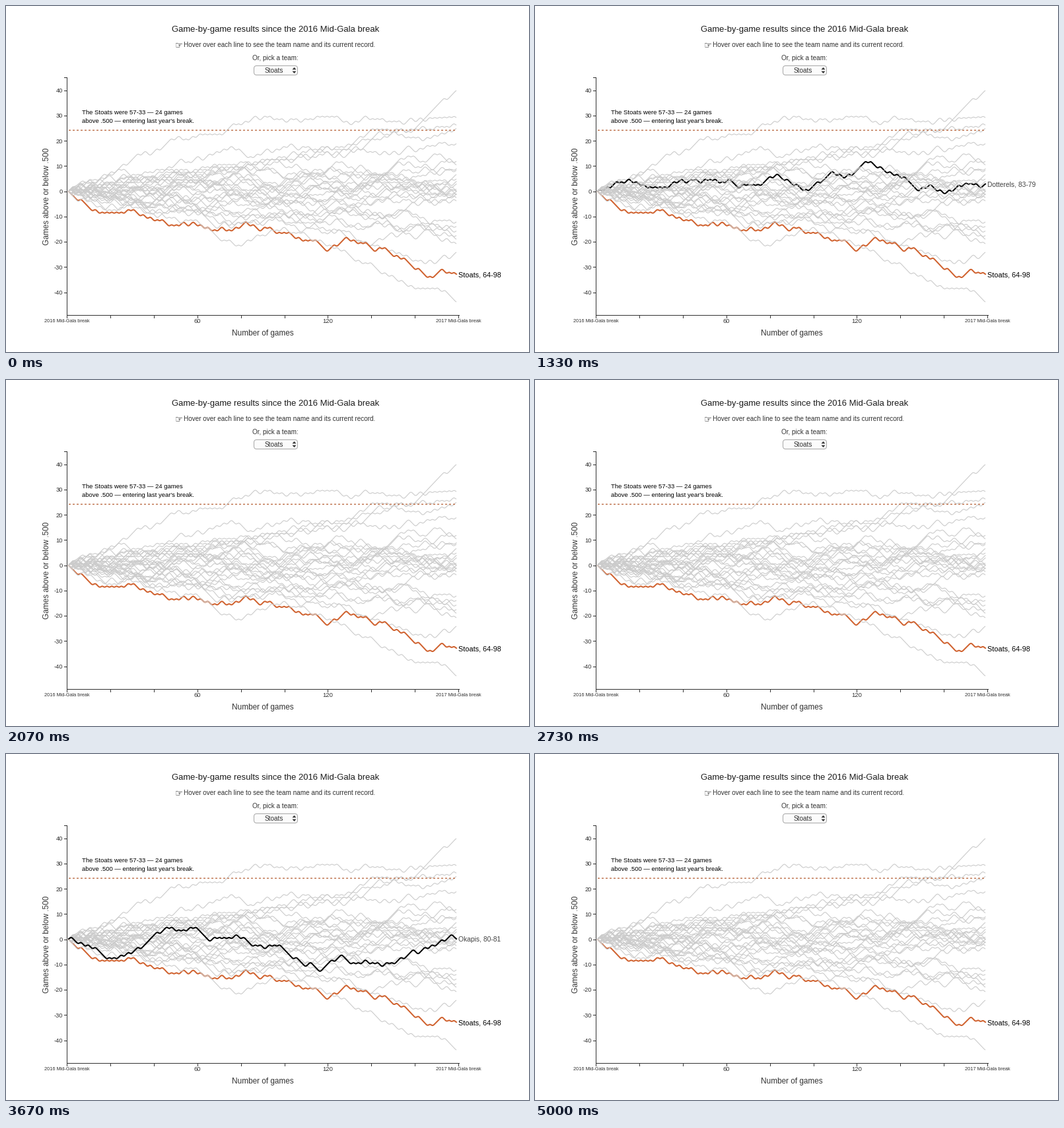
A matplotlib script that plays this animation: 792 px wide and 524 px high, repeating every 5070 ms.

```python
import numpy as np
import matplotlib.pyplot as plt
from matplotlib.animation import FuncAnimation
from matplotlib.collections import LineCollection
from matplotlib.patches import FancyBboxPatch, Polygon

W, H, DPI = 792, 524, 100
PT = 72 / DPI
LEFT, RIGHT, ZERO, UNIT = 95, 682, 280.5, 3.825
GREY, ORANGE, INK = "#cbcbcb", "#d0622f", "#333333"
FRAMES, INTERVAL, RATE = 169, 30, 15

plt.rcParams["font.family"] = ["Liberation Sans", "DejaVu Sans"]
rng = np.random.default_rng(16)
grid = np.arange(LEFT, RIGHT + 1)
games = np.linspace(LEFT, RIGHT, 163)
season = np.linspace(0, 1, len(games))

fig = plt.figure(figsize=(W / DPI, H / DPI), dpi=DPI, facecolor="white")
ax = fig.add_axes([0, 0, 1, 1])
ax.set(xlim=(0, W), ylim=(H, 0))
ax.axis("off")


def to_px(value):
    return ZERO - UNIT * value


def smooth(record):
    """Sample a game-by-game record at every pixel and round off its corners."""
    kernel = np.hanning(9)
    kernel /= kernel.sum()
    dense = np.pad(np.interp(grid, games, to_px(record)), 4, mode="edge")
    return np.convolve(dense, kernel, mode="valid")


def following(*course):
    """Walk of wins and losses that keeps close to key points (x, record)."""
    target = np.interp(games, course[::2], course[1::2])
    walk = [0]
    for goal in target[1:]:
        walk.append(walk[-1] + (1 if goal - walk[-1] + rng.normal(0, 0.6) > 0 else -1))
    return smooth(walk + season**12 * (target[-1] - walk[-1]))


def wandering(end, floor):
    """Free walk of wins and losses that finishes at a given record."""
    while True:
        walk = np.r_[0, np.cumsum(rng.choice([-1, 1], len(games) - 1))]
        drift = walk - season * walk[-1]
        path = smooth(drift + end * season**0.8)
        if np.abs(drift).max() < 10 and (path < floor + 5).all():
            return path


def text(x, y, s, size, color=INK, **kw):
    kw = {"ha": "left", "va": "center_baseline", **kw}
    return ax.text(x, y, s, fontsize=size * PT, color=color, zorder=8, **kw)


def rule(xs, ys, color=INK, width=1, **kw):
    return ax.plot(xs, ys, color=color, lw=width * PT, **kw)[0]


# Team paths
stoats = following(95, 0, 113, -4.5, 145, -8.5, 190, -8, 222, -12, 267, -14, 290, -12.5,
                   310, -15, 348, -15.5, 360, -12.5, 380, -15, 402, -14.5, 432, -18.5,
                   467, -19, 487, -23.5, 519, -18.5, 556, -22.5, 595, -25, 639, -35.5,
                   663, -30, 675, -30.5, 682, -33)
red_newts = following(95, 0, 134, 1, 166, 4.5, 202, 4, 245, 8, 290, 3.5, 320, 2.5, 345, 5.5,
                      384, 1.5, 400, -2.5, 450, -5, 489, -3, 503, 0.5, 520, -2.5,
                      554, 3.5, 625, 3.5, 652, 1.5, 666, -2.5, 682, 0)
dotterels = following(95, 0, 121, 4, 145, 4.5, 168, 2, 192, 2, 212, 4.5, 299, 4, 306, 1.5,
                      339, 2, 363, 7, 409, 0.5, 448, 7, 470, 5.5, 500, 12, 551, 6,
                      581, 0.5, 600, 3, 621, 0, 658, 3.5, 682, 3)
tapirs = following(95, 0, 128, 0.5, 170, 9, 216, 2.5, 257, 8.5, 308, 6, 328, 9.5, 370, 8.5,
                   410, 12, 426, 8.5, 438, 10.5, 452, 8, 507, 8.5, 545, 4.5, 575, 7.5,
                   613, 5, 634, -1.5, 682, -1.5)
okapis = following(95, 0, 118, -1.5, 152, -7.5, 191, -6, 222, 2, 246, 4.5, 290, 4, 306, -0.5,
                   346, 2, 374, -3, 408, -2, 447, -10, 478, -11.5, 502, -7, 526, -9.5,
                   585, -10, 614, -5.5, 655, -2, 674, 2, 682, 0)

outer = [
    following(95, 0, 180, 10, 200, 14, 262, 21, 290, 21, 385, 29, 447, 28, 490, 30,
              520, 27, 553, 29, 600, 27, 682, 29),
    following(95, 0, 340, 10, 440, 13, 530, 20, 562, 25, 615, 24, 645, 32, 682, 40),
    following(95, 0, 220, 8, 342, 17, 370, 14, 430, 18, 500, 14, 600, 24, 682, 26),
    following(95, 0, 320, 10, 500, 15, 575, 24, 605, 20, 682, 25),
    following(95, 0, 300, 7, 480, 17, 590, 15, 682, 19),
    following(95, 0, 290, -13, 345, -21, 410, -15, 470, -19, 560, -31, 620, -38,
              664, -39, 682, -44),
    following(95, 0, 300, -8, 450, -12, 560, -22, 650, -29, 682, -24),
]
ends = [*np.linspace(12, 5, 5), *np.linspace(1, -4, 5), *np.linspace(-12, -21, 6)]
greys = outer + [wandering(end, stoats) for end in ends]

for z, group in ((2, greys[::2]), (4, greys[1::2])):
    ax.add_collection(LineCollection([np.c_[grid, y] for y in group], colors=GREY,
                                     linewidths=1.1 * PT, zorder=z))
rule(grid, stoats, ORANGE, 2, zorder=3)

# label, path, stacking, first and last tick of the hover
hovers = [
    ("Red Newts, 79-80", red_newts, 3.1, 9, 12),
    ("Dotterels, 83-79", dotterels, 3.2, 18, 21),
    ("Tapirs, 79-80", tapirs, 3.3, 23, 26),
    ("Gannets, 82-78", wandering(4, stoats), 3.4, 32, 34),
    ("Gerbils, 80-81", wandering(-1, stoats), 3.5, 38, 40),
    ("Okapis, 80-81", okapis, 5, 53, 57),
    ("Voles, 85-76", wandering(9, stoats), 3.6, 62, 65),
]
lines = [rule(grid, path, GREY, 1.1, zorder=z) for _, path, z, _, _ in hovers]
hover_label = text(685, 0, "", 10.2, "#444444")

# Axes
rule([92, 92], [108, 468], snap=True)
rule([88, 92], [108, 108], snap=True)
rule([92, 685.5], [468, 468], snap=True)
for value in range(-40, 41, 10):
    y = to_px(value)
    rule([88, 92], [y, y], snap=True)
    text(86, y, str(value), 9.3, ha="right")
for n in range(10):
    x = 92 + 65.9 * n
    rule([x, x], [468, 472], snap=True)
for x, label, size in ((92, "2016 Mid-Gala break", 7.4), (290, "60", 9.5),
                       (487.5, "120", 9.5), (685.5, "2017 Mid-Gala break", 7.4)):
    text(x, 476.5, label, size, ha="center")
text(388.5, 494.5, "Number of games", 11.7, ha="center")
text(62, 288, "Games above or below .500", 11.7, ha="center", va="center", rotation=90)

# Heading and team picker
text(408, 34.5, "Game-by-game results since the 2016 Mid-Gala break", 13, "#1c1c1c", ha="center")
text(256, 58, "\u261e", 13.5, family="DejaVu Sans")
text(269, 58, "Hover over each line to see the team name and its current record.", 10)
text(408, 78.5, "Or, pick a team:", 10, ha="center")
ax.add_patch(FancyBboxPatch((375.5, 90.5), 66, 14, boxstyle="round,pad=0,rounding_size=4",
                            fc="#fbfbfb", ec="#a8a8a8", lw=PT))
text(406, 97.3, "Stoats", 10, ha="center")
for side in (-1, 1):
    y = 97.5 + 1.2 * side
    ax.add_patch(Polygon([(433.5, y), (439.5, y), (436.5, y + 3.4 * side)], fc=INK, lw=0))

# Reference line and notes
rule([95, 681], [188.2, 188.2], "#bd6f48", 1.4, dashes=(3 / 1.4, 3 / 1.4), snap=False, zorder=6)
text(115, 161, "The Stoats were 57-33 \u2014 24 games", 9.45, "black")
text(115, 173.5, "above .500 \u2014 entering last year's break.", 9.45, "black")
text(685, 406.5, "Stoats, 64-98", 10.8, "black")


def update(i):
    tick = int((i * INTERVAL + 24) * RATE / 1000)
    hover_label.set_text("")
    for line, (label, path, _, first, last) in zip(lines, hovers):
        active = first <= tick <= last
        line.set_color("black" if active else GREY)
        line.set_linewidth((2 if active else 1.1) * PT)
        if active:
            hover_label.set_text(label)
            hover_label.set_y(path[-1])
    return [*lines, hover_label]


anim = FuncAnimation(fig, update, frames=FRAMES, interval=INTERVAL, repeat=True)
plt.show()
```
